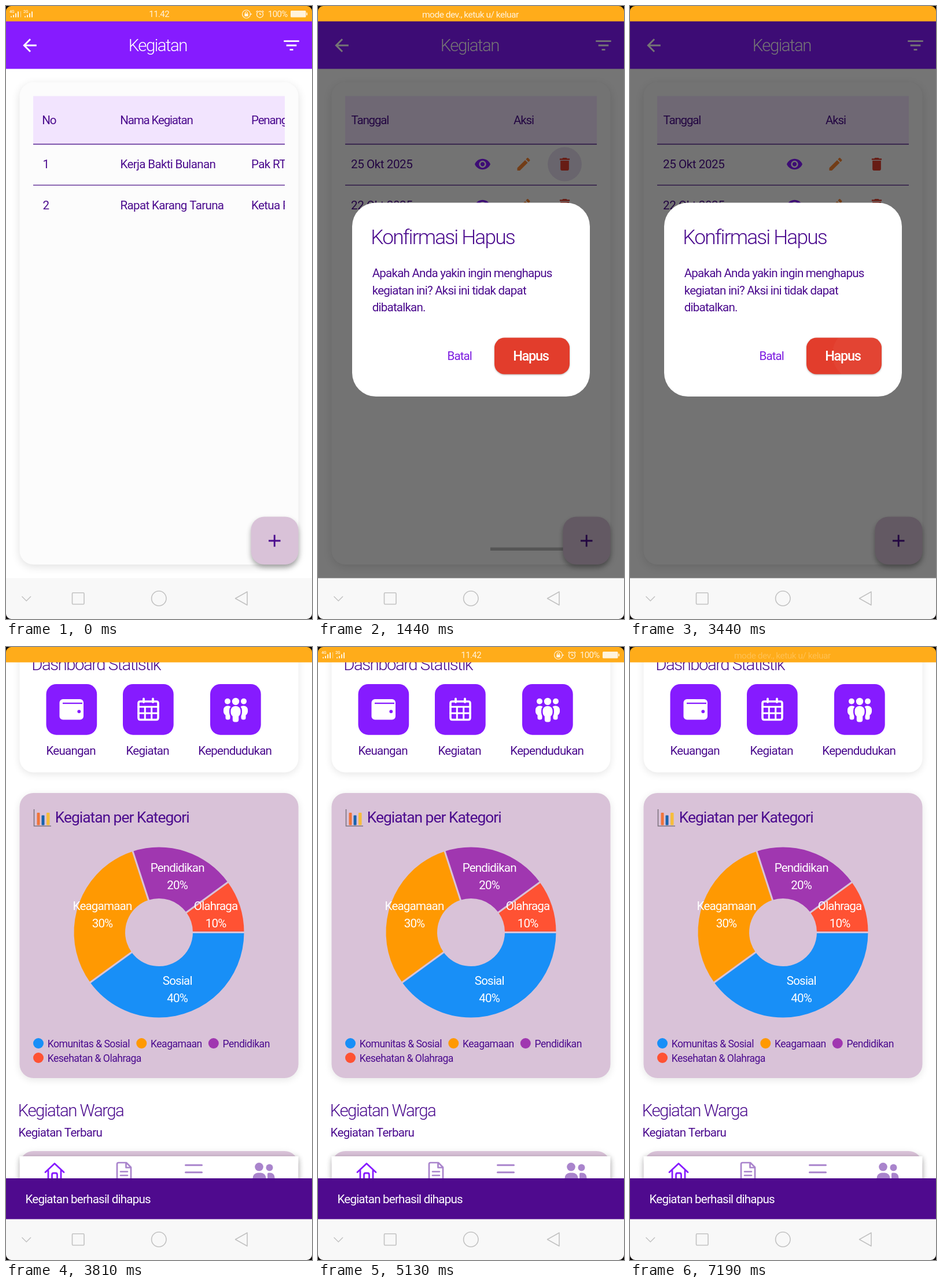
Animation, 529 px wide and 1058 px high, one loop 7250 ms. Source, as an HTML page with a canvas:

```html
<!DOCTYPE html>
<html lang="id">
<head>
<meta charset="utf-8">
<title>Kegiatan</title>
<style>
html, body { margin: 0; width: 100%; height: 100%; overflow: hidden; background: #fff; }
canvas { display: block; width: 529px; height: 1058px; }
</style>
</head>
<body>
<canvas id="stage" width="529" height="1058"></canvas>
<script>
const ctx = document.getElementById('stage').getContext('2d');
const W = 529, H = 1058, LOOP = 7250;
const INK = '#4b0b8e', VIOLET = '#861bff', THISTLE = '#d9c2d8', RED = '#e23d2c', AMBER = '#ffac1a';
const SCROLL = 593, VIEW = { x: 47, w: 435 };

const ICONS = {
  back: 'M20 11H7.83l5.59-5.59L12 4l-8 8 8 8 1.41-1.41L7.83 13H20v-2z',
  filter: 'M10 18h4v-2h-4v2zM3 6v2h18V6H3zm3 7h12v-2H6v2z',
  eye: 'M12 4.5C7 4.5 2.73 7.61 1 12c1.73 4.39 6 7.5 11 7.5s9.27-3.11 11-7.5c-1.73-4.39-6-7.5-11-7.5zM12 17c-2.76 0-5-2.24-5-5s2.24-5 5-5 5 2.24 5 5-2.24 5-5 5zm0-8c-1.66 0-3 1.34-3 3s1.34 3 3 3 3-1.34 3-3-1.34-3-3-3z',
  edit: 'M3 17.25V21h3.75L17.81 9.94l-3.75-3.75L3 17.25zM20.71 7.04c.39-.39.39-1.02 0-1.41l-2.34-2.34c-.39-.39-1.02-.39-1.41 0l-1.83 1.83 3.75 3.75 1.83-1.83z',
  trash: 'M6 19c0 1.1.9 2 2 2h8c1.1 0 2-.9 2-2V7H6v12zM19 4h-3.5l-1-1h-5l-1 1H5v2h14V4z'
};

const ramp = (t, a, b) => Math.min(1, Math.max(0, (t - a) / (b - a)));
const smooth = p => p * p * (3 - 2 * p);
const easeOut = p => 1 - (1 - p) ** 3;
// Rises over a..b, falls over c..d
const pulse = (t, a, b, c, d) => smooth(ramp(t, a, b)) * (1 - smooth(ramp(t, c, d)));

function group(fn, alpha = 1) {
  if (alpha <= 0) return;
  ctx.save();
  ctx.globalAlpha *= alpha;
  fn();
  ctx.restore();
}

function box(x, y, w, h, r, color, shadow) {
  ctx.save();
  if (shadow) {
    ctx.shadowColor = `rgba(0,0,0,${shadow[0]})`;
    ctx.shadowBlur = shadow[1];
    ctx.shadowOffsetY = shadow[2];
  }
  ctx.fillStyle = color;
  ctx.beginPath();
  ctx.roundRect(x, y, w, h, r);
  ctx.fill();
  ctx.restore();
}

function disc(x, y, r, color) {
  ctx.fillStyle = color;
  ctx.beginPath();
  ctx.arc(x, y, r, 0, 7);
  ctx.fill();
}

function ring(x, y, r, color, width) {
  ctx.strokeStyle = color;
  ctx.lineWidth = width;
  ctx.beginPath();
  ctx.arc(x, y, r, 0, 7);
  ctx.stroke();
}

function line(d, color, width) {
  ctx.strokeStyle = color;
  ctx.lineWidth = width;
  ctx.stroke(new Path2D(d));
}

function icon(name, x, y, size, color) {
  const k = size / 24;
  ctx.save();
  ctx.translate(x - size / 2, y - size / 2);
  ctx.scale(k, k);
  ctx.fillStyle = color;
  ctx.fill(new Path2D(ICONS[name]));
  ctx.restore();
}

// cy is the middle of the capital letters
function text(s, x, cy, { size = 20.57, color = INK, gap = -.038, weight = 400, align = 'left' } = {}) {
  ctx.font = `${weight} ${size}px Roboto, sans-serif`;
  ctx.letterSpacing = (gap * size).toFixed(2) + 'px';
  ctx.textAlign = align;
  ctx.fillStyle = color;
  ctx.fillText(s, x, cy + size * .356);
}

const heading = (s, x, cy, size, color = INK) =>
  text(s, x, cy, { size, color, weight: 300, gap: -.052 });

function tableRow(cy, cells) {
  const row = { gap: -.032 };
  text(cells[0], 63.5, cy, row);
  text(cells[1], 197.5, cy, row);
  text(cells[2], 424, cy, row);
  text(cells[3], 57 + SCROLL, cy, { gap: -.02 });
  icon('eye', 284.5 + SCROLL, cy, 29.4, VIOLET);
  icon('edit', 355.5 + SCROLL, cy, 29.4, '#fa8633');
  icon('trash', 426.5 + SCROLL, cy, 29.4, RED);
}

function table(t) {
  const s = SCROLL * smooth(ramp(t, 80, 720));
  const stretch = .012 * pulse(t, 690, 800, 820, 1010);
  ctx.beginPath();
  ctx.rect(VIEW.x, 150, VIEW.w, 790);
  ctx.clip();
  ctx.fillStyle = '#f2e4fe';
  ctx.fillRect(VIEW.x, 155.5, VIEW.w, 82.5);

  group(() => {
    ctx.translate(-s, 0);
    const head = { gap: -.058 };
    text('No', 62.3, 197, head);
    text('Nama Kegiatan', 197.3, 197, head);
    text('Penanggung Jawab', 424, 197, head);
    text('Tanggal', 57.5 + SCROLL, 197, head);
    text('Aksi', 338 + SCROLL, 197, head);
  });

  group(() => disc(426.5, 273, 12 + 17.4 * easeOut(ramp(t, 1080, 1300)), INK),
    .13 * pulse(t, 1080, 1180, 1500, 1800));

  group(() => {
    ctx.translate(482, 0);
    ctx.scale(1 + stretch, 1);
    ctx.translate(-482 - s, 0);
    tableRow(273, ['1', 'Kerja Bakti Bulanan', 'Pak RT', '25 Okt 2025']);
    tableRow(344, ['2', 'Rapat Karang Taruna', 'Ketua Pemuda', '22 Okt 2025']);
  });
  line('M47 238.5H482', '#54208f', 1.5);
  line('M47 309.3H482', '#6a3a9c', 1.4);

  group(() => {
    ctx.fillStyle = '#bbb';
    ctx.fillRect(VIEW.x + s / (SCROLL + VIEW.w) * VIEW.w, 934.5, 184, 6.3);
  }, pulse(t, 90, 240, 1600, 1900));
}

function listPage(t) {
  ctx.fillStyle = '#fff';
  ctx.fillRect(0, 26, W, 962);
  box(23.5, 131.5, 482, 832.5, 24, '#fcfcfc', [.12, 15, 4]);
  group(() => table(t));
  ctx.fillStyle = VIOLET;
  ctx.fillRect(0, 26, W, 82.5);
  icon('back', 41, 68, 35.3, '#fff');
  heading('Kegiatan', 211.7, 68, 29.4, '#fff');
  icon('filter', 493.5, 68, 35.3, '#fff');
  box(423.5, 881.5, 82, 82.5, 23, THISTLE, [.32, 9, 5]);
  line('M454 923H474.5M464.2 912.7V933.3', INK, 2.9);
}

function dialog(t) {
  ctx.fillStyle = 'rgba(0,0,0,.54)';
  ctx.fillRect(0, 26, W, 962);
  box(59, 339.5, 411, 334.5, 41, '#fff');
  heading('Konfirmasi Hapus', 91.3, 398, 35.3);
  ['Apakah Anda yakin ingin menghapus', 'kegiatan ini? Aksi ini tidak dapat', 'dibatalkan.']
    .forEach((s, i) => text(s, 93.7, 461 + i * 29.3));
  text('Batal', 223.5, 604, { color: '#7b1ae0', gap: -.045 });
  box(305, 572.5, 130, 63, 17.6, RED, [.3, 3, 1]);
  group(() => {
    ctx.beginPath();
    ctx.roundRect(305, 572.5, 130, 63, 17.6);
    ctx.clip();
    disc(394, 601, 10 + 90 * easeOut(ramp(t, 3410, 3620)), '#fff');
  }, .1 * ramp(t, 3410, 3500));
  text('Hapus', 337.2, 604, { size: 23.5, color: '#fff', gap: -.055, weight: 500 });
}

function wallet() {
  box(92.5, 90, 41.5, 35.5, 6, '#fff');
  line('M98 97.2H132', VIOLET, 2.2);
  disc(126.3, 111.3, 2.9, VIOLET);
}

function calendar() {
  ctx.lineJoin = ctx.lineCap = 'round';
  line('M232 94H260Q263 94 263 97V122Q263 125.5 260 125.5H232Q229 125.5 229 122V97Q229 94 232 94Z', '#fff', 3.6);
  line('M238 89.5V95M254 89.5V95', '#fff', 3.8);
  line('M229 103.3H263M229 114.3H263M240.3 103V125M251.7 103V125', '#fff', 3);
}

function people() {
  disc(383, 93.8, 5, '#fff');
  disc(411, 93.8, 5, '#fff');
  for (const x of [376, 403]) {
    box(x, 101.5, 15, 17, 7, '#fff');
    box(x + 3.5, 111, 8, 14.5, 3.5, '#fff');
  }
  box(386, 99.5, 22, 24, 10, VIOLET);
  disc(397, 94, 6.2, '#fff');
  box(388.5, 102, 17, 19, 8, '#fff');
  box(391.8, 114, 10.4, 15.5, 4, '#fff');
}

function donut() {
  const cx = 264.5, cy = 492.5;
  const parts = [[.4, '#188ff7'], [.3, '#ff9902'], [.2, '#a037b0'], [.1, '#ff5233']];
  let from = 0;
  for (const [share, color] of parts) {
    const to = from + share * 2 * Math.PI;
    ctx.fillStyle = color;
    ctx.beginPath();
    ctx.arc(cx, cy, 147, from, to);
    ctx.arc(cx, cy, 58.5, to, from, true);
    ctx.fill();
    from = to;
  }
  from = 0;
  for (const [share] of parts) {
    const c = Math.cos(from), s = Math.sin(from);
    line(`M${cx + 57 * c} ${cy + 57 * s}L${cx + 148 * c} ${cy + 148 * s}`, THISTLE, 3);
    from += share * 2 * Math.PI;
  }
  const label = (name, pct, x, y) => {
    const style = { color: '#fff', gap: -.04, align: 'center' };
    text(name, x, y, style);
    text(pct, x, y + 29.3, style);
  };
  label('Sosial', '40%', 296.2, 576);
  label('Keagamaan', '30%', 166.5, 447);
  label('Pendidikan', '20%', 296.2, 381);
  label('Olahraga', '10%', 362.6, 447);
}

function legend(name, x, y, color) {
  disc(x, y - .5, 9, color);
  text(name, x + 15.7, y + .3, { size: 17.6, gap: -.03 });
}

function bottomTabs() {
  const faded = '#a984cc';
  box(23.5, 879, 482, 120, 0, '#fff', [.3, 9, 2]);
  ctx.lineJoin = ctx.lineCap = 'round';
  line('M68 906.5L84 891.5 100 906.5M73 903V925H95V903M79.5 925V911Q79.5 908 82 908H86Q88.5 908 88.5 911V925', VIOLET, 2.8);
  line('M194.5 890H208L216 898V925H192V892.5Q192 890 194.5 890ZM207.5 890.5V898.5H215.5M198 905.5H210M198 912H210', faded, 2.7);
  line('M310.5 894.3H338.5M310.5 906.7H338.5', faded, 3);
  disc(437.5, 897.3, 7.3, faded);
  disc(455.5, 898.5, 6, faded);
  box(426.5, 907.5, 23, 20, [9, 9, 0, 0], faded);
  box(452, 907.5, 12.5, 20, [2, 8, 0, 0], faded);
}

function dashboard(t) {
  ctx.fillStyle = '#fff';
  ctx.fillRect(0, 26, W, 962);
  box(23.5, -40, 482, 256.5, 24, '#fff', [.1, 13, 3]);
  heading('Dashboard Statistik', 44.3, 29.3, 29.4);
  for (const x of [69.5, 202, 353]) box(x, 64, 87.7, 87.7, 17.6, VIOLET);
  group(wallet);
  group(calendar);
  group(people);
  text('Keuangan', 69.5, 179);
  text('Kegiatan', 207.5, 179);
  text('Kependudukan', 332.3, 179);

  box(23.5, 252, 482, 492, 24, THISTLE, [.1, 13, 3]);
  line('M48.5 280V309H78', '#7d7480', 1.6);
  box(53.5, 286, 5, 21.5, 1, '#f0743a');
  box(61.5, 290.5, 5, 17, 1, '#1763ad');
  box(70, 286, 5.5, 21.5, 1, '#f6bd3c');
  text('Kegiatan per Kategori', 84.7, 294, { size: 26.4 });
  donut();
  legend('Komunitas & Sosial', 56, 684.5, '#188ff7');
  legend('Keagamaan', 234.3, 684.5, '#ff9902');
  legend('Pendidikan', 358.8, 684.5, '#a037b0');
  legend('Kesehatan & Olahraga', 56, 709.5, '#ff5233');

  heading('Kegiatan Warga', 20.8, 800, 29.4);
  text('Kegiatan Terbaru', 21.5, 838, { gap: -.034 });
  box(23.5, 870, 482, 110, 24, THISTLE, [.1, 13, 3]);
  group(bottomTabs);

  group(() => {
    ctx.translate(0, 71 * (1 - easeOut(ramp(t, 3620, 3800))));
    ctx.fillStyle = '#4f0a8e';
    ctx.fillRect(0, 917, W, 71);
    text('Kegiatan berhasil dihapus', 33.4, 953, { color: '#fff' });
  });
}

function statusIcons() {
  const white = '#fff';
  const signal = (x, name) => {
    text(name, x, 10, { size: 7, color: white, weight: 500 });
    [2, 4, 7, 10].forEach((h, i) => {
      ctx.fillStyle = white;
      ctx.fillRect(x + 2 + i * 4, 19.5 - h, 2, h);
    });
  };
  signal(6, '4G');
  signal(30, '2G');
  group(() => line('M25.5 9V19.5', white, 1), .6);
  text('11.42', 247.3, 14, { size: 15, color: white, gap: -.04 });
  ring(415.5, 14, 7, white, 1.2);
  box(412.3, 13, 6.4, 5, 1, white);
  line('M413.5 13V11.5Q415.5 8 417.5 11.5V13', white, 1.2);
  line('M421.5 14H425', white, 1.4);
  ring(439, 14.5, 5.5, white, 1.3);
  line('M439 11.5V14.7H441.5M432.5 10.5L435 8M445.5 10.5L443 8', white, 1.3);
  text('100%', 452.8, 14, { size: 15, color: white, gap: -.04 });
  box(492, 8, 26.5, 11.5, 1.5, white);
  box(519.3, 11.5, 1.8, 4.5, 0, white);
}

function statusBar(t) {
  ctx.fillStyle = AMBER;
  ctx.fillRect(0, 0, W, 26.5);
  const clock = 1 - smooth(ramp(t, 150, 450)) + pulse(t, 3950, 4350, 6350, 6650);
  const notice = pulse(t, 850, 1250, 3080, 3380) + smooth(ramp(t, 7050, 7450));
  group(statusIcons, .85 * clock);
  group(() => text('mode dev., ketuk u/ keluar', 180, 14, { size: 15.5, color: '#fff', gap: -.032 }), .85 * notice);
}

function navBar() {
  const gray = '#c2c2c2';
  ctx.fillStyle = '#f8f8f8';
  ctx.fillRect(0, 987.5, W, 71);
  line('M27.5 1019L35.3 1026.8 43 1019', gray, 1.5);
  line('M116 1012.7H133.5Q135 1012.7 135 1014.2V1031Q135 1032.5 133.5 1032.5H116Q114.5 1032.5 114.5 1031V1014.2Q114.5 1012.7 116 1012.7Z', gray, 1.6);
  ring(264.3, 1022.5, 12.7, gray, 1.6);
  ctx.lineJoin = 'round';
  line('M396.5 1022.5L417 1011V1034Z', gray, 1.6);
}

function corners() {
  ctx.fillStyle = '#0d0808';
  ctx.beginPath();
  ctx.rect(0, 0, W, H);
  ctx.roundRect(0, 0, W, H, 9);
  ctx.fill('evenodd');
}

function draw(t) {
  ctx.clearRect(0, 0, W, H);
  const page = smooth(ramp(t, 3600, 3780));
  if (page < 1) {
    group(() => listPage(t));
    group(() => dialog(t), ramp(t, 1230, 1390) * (1 - ramp(t, 3500, 3640)));
  }
  group(() => dashboard(t), page);
  group(() => statusBar(t));
  group(navBar);
  corners();
}

const start = performance.now();
function tick() {
  draw((performance.now() - start) % LOOP);
  requestAnimationFrame(tick);
}
tick();
</script>
</body>
</html>
```
